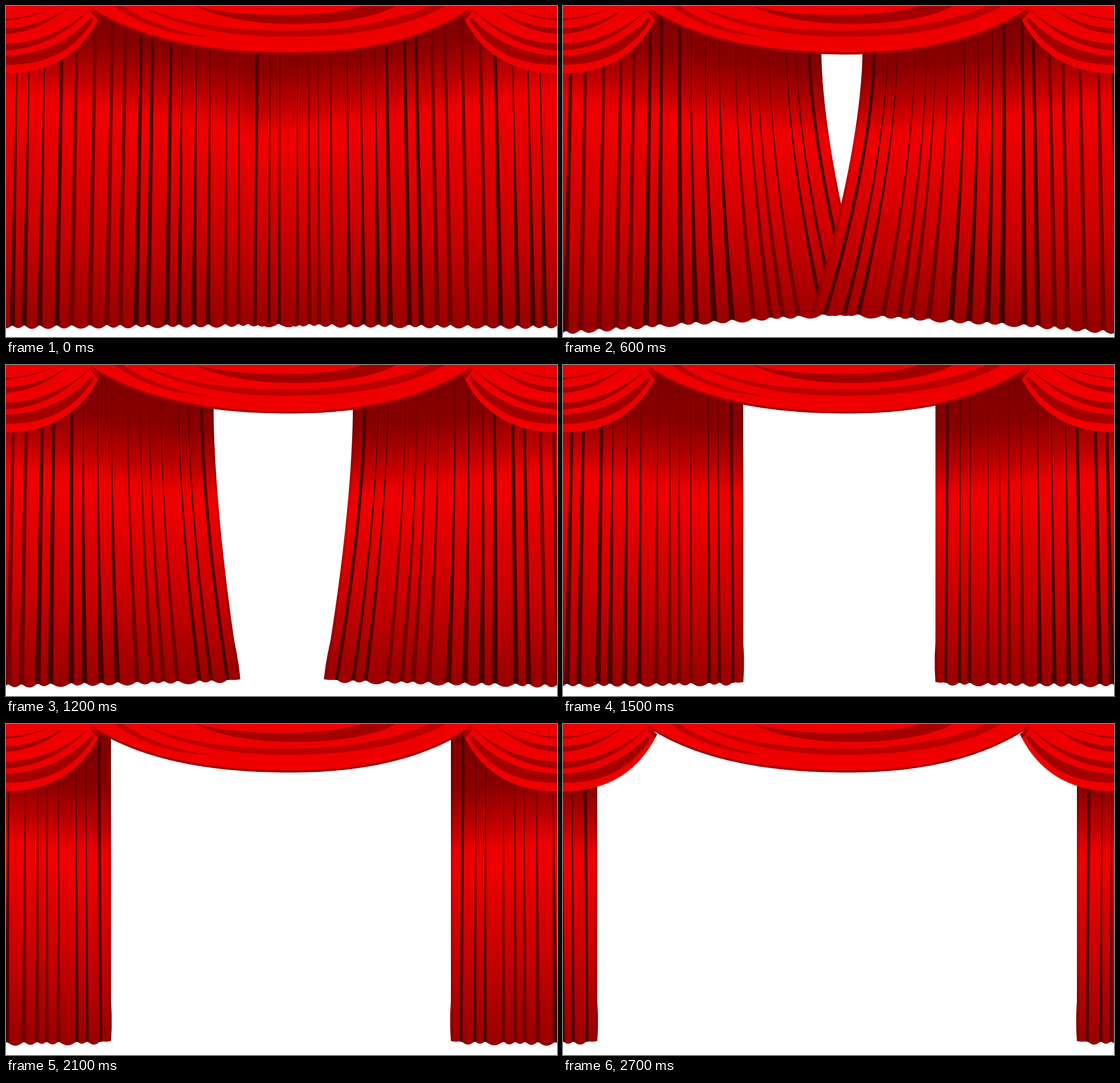
Recreate the animation shown at these times as an HTML page with a canvas. Size 966 by 580 pixels, loop 4.7 s.

```html
<!DOCTYPE html>
<html>
<head>
<meta charset="utf-8">
<style>
html, body { margin: 0; width: 100%; height: 100%; overflow: hidden; background: #fff; }
canvas { display: block; }
</style>
</head>
<body>
<canvas id="stage" width="966" height="580"></canvas>
<script>
const ctx = document.getElementById('stage').getContext('2d');
const LOOP = 4700, STEP = 300, LAST = 9, WIDTH = 548;
const RED = '#ee0000', DEEP = '#a40000', MID = '#bb0000';

// Inner edge of each panel at key steps
const keys = [0, 1, 2, 3, 5, 7, 9];
const leftEdge = [537, 492, 453, 412, 316, 184, 60];
const rightEdge = [419, 506, 525, 563, 653, 780, 901];

// Gaps between pleats, counted outward from the inner edge
const gaps = [21, 23, 17, 31, 20, 16, 22, 29, 24, 25, 20, 32, 20, 28, 23, 30, 32, 26, 30, 27, 21];
let reach = 0;
const folds = gaps.map((gap, i) => {
  const top = reach += gap;
  const low = top - 4 + 13 * Math.min(1, top / 300);
  const broad = i === 0 || (i > 9 && i < 18);
  const dark = Math.cos(2 * Math.PI * i / 9.5) > -.1;
  return { top, low, thin: broad ? 5 : 1, wide: 5 + Math.min(4, i / 2), level: dark ? 74 : 114 };
});
const cusps = [0, ...folds.map(f => f.low), WIDTH];

function edgeAt(edges, step) {
  const i = Math.max(1, keys.findIndex(k => k >= step));
  const part = (step - keys[i - 1]) / (keys[i] - keys[i - 1]);
  return edges[i - 1] + (edges[i] - edges[i - 1]) * part;
}

const depth = y => Math.max(0, (y - 85) / 470);

function hem(o, lift) {
  const i = Math.max(1, cusps.findIndex(c => c > o));
  const a = cusps[i - 1], w = cusps[i] - a;
  const bulge = i === 1 ? 1 : Math.min(7, w / 4);
  return 555.5 + o * .007 + bulge * Math.sin(Math.PI * (o - a) / w) - lift * (1 - o / 300);
}

function panel(edge, dir, bend, lift) {
  const place = (o, y) => {
    const pull = bend * Math.max(0, 1 - o / 330) ** 1.5 * depth(y) ** 1.6;
    const flare = o < 4 && y > 485 ? 1.5 * Math.sin(Math.PI * (y - 485) / 72) : 0;
    return edge + dir * (o - pull - flare);
  };
  // A ribbon between two curves, given as functions of height
  const ribbon = (a, b, endA, endB, fill) => {
    const n = 24;
    ctx.beginPath();
    for (let i = 0; i <= n; i++) ctx.lineTo(place(a(endA * i / n), endA * i / n), endA * i / n);
    for (let i = n; i >= 0; i--) ctx.lineTo(place(b(endB * i / n), endB * i / n), endB * i / n);
    ctx.fillStyle = fill;
    ctx.fill();
  };

  for (let o = 0; o < WIDTH - 2; o += 2) {
    const peak = 240 - 80 * (o / 540) ** 1.2;
    const tone = (1 + .02 * Math.sin(o * 2.3)) * (bend && o < 3 ? .88 : 1);
    const grad = ctx.createLinearGradient(0, 0, 0, 570);
    const stop = (y, r) => grad.addColorStop(y / 570, `rgb(${Math.round(r * tone)},0,0)`);
    stop(0, 122);
    stop(peak - 125, 138);
    stop(peak - 60, 188);
    stop(peak - 12, 236);
    stop(peak + 15, 238);
    stop(400, 202);
    stop(560, 152);
    const next = Math.min(o + 3, WIDTH);
    ribbon(() => o, () => next, hem(o, lift), hem(next, lift), grad);
  }

  for (const { top, low, thin, wide, level } of folds) {
    const side = s => y => {
      const t = Math.min(1, depth(y));
      return top + (low - top) * t + s * (thin + (wide - thin) * t) / 2;
    };
    const end = hem(low, lift) + 1;
    ribbon(side(-1), side(1), end, end, `rgb(${level},0,0)`);
  }
}

function shape(fill, d) {
  ctx.fillStyle = fill;
  ctx.fill(new Path2D(d));
}

function valance() {
  const swag = 'M140,0 C240,70 380,85 498,85 C610,85 730,68 826,0Z';
  shape(DEEP, swag);
  ctx.save();
  ctx.translate(0, -4);
  shape(RED, swag);
  ctx.restore();
  shape(MID, 'M237,0 C320,35 400,43 490,43 C590,43 680,28 742,0 L770,0 C700,40 600,54 490,54 C400,54 300,38 237,0Z');
  shape(MID, 'M190,0 C230,30 290,52 352,54 C290,43 240,25 205,0Z');
  shape(DEEP, 'M333,0 C400,20 560,22 625,0 L683,0 C620,38 420,46 333,0Z');
}

// A crease that tapers from the stage side up to the knot
function crease(y, thick, endX, endY) {
  const mid = endX * .55;
  shape(DEEP, `M0,${y} Q${mid},${y - 2} ${endX},${endY} Q${mid},${y + thick - 4} 0,${y + thick}Z`);
}

function sideSwag() {
  shape(RED, 'M0,0 H146 L165,18 C130,90 70,118 0,118Z');
  shape(DEEP, 'M0,87 C60,85 110,62 150,20 L154,24 C116,85 62,103 0,103Z');
  crease(66, 12, 148, 6);
  crease(39, 10, 112, 0);
  crease(22, 4, 88, 0);
  shape(DEEP, 'M147,5 L165,18 L161,25 L151,13Z');
}

function draw(step) {
  const sway = Math.sin(Math.PI * Math.min(step, 5) / 5);
  const bend = 98 * Math.max(0, sway) ** 1.3;
  const lift = 24 * Math.max(0, sway) ** 3;
  ctx.fillStyle = '#fff';
  ctx.fillRect(0, 0, 966, 580);
  panel(edgeAt(leftEdge, step), -1, bend * .96, lift);
  panel(edgeAt(rightEdge, step), 1, bend * 1.04, lift);
  valance();
  sideSwag();
  ctx.save();
  ctx.translate(966, 0);
  ctx.scale(-1, 1);
  sideSwag();
  ctx.restore();
}

let shown = -1;
function tick() {
  const step = Math.min(LAST, Math.floor(performance.now() % LOOP / STEP));
  if (step !== shown) draw(shown = step);
  requestAnimationFrame(tick);
}
tick();
</script>
</body>
</html>
```
